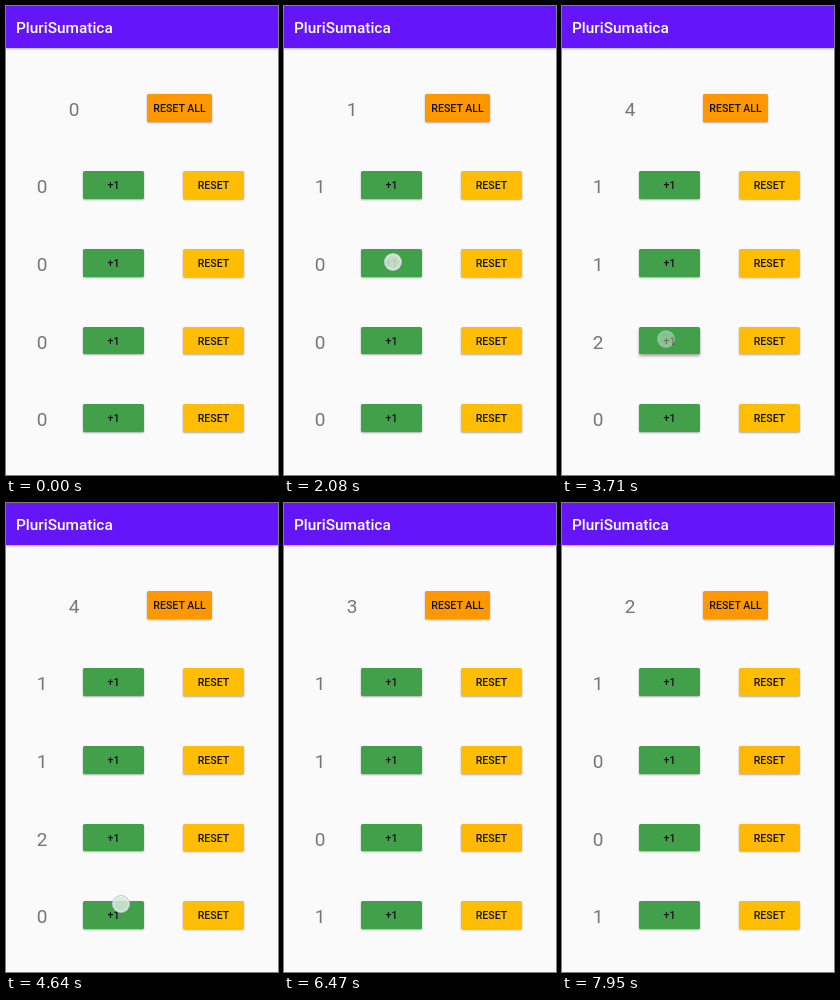
These frames come from a looping animation (272 px wide and 469 px high, 8000 ms). An HTML page:

```html
<!DOCTYPE html>
<html lang="es">
<head>
<meta charset="utf-8">
<style>
html, body { margin: 0; width: 272px; height: 469px; overflow: hidden; background: #fafafa; }
body { position: relative; font-family: Roboto, sans-serif; }
div { position: absolute; box-sizing: border-box; text-align: center; white-space: nowrap; }
header {
  height: 42px; padding-left: 10px; background: #6515fa; color: #fff;
  font: 500 15.4px/44px Roboto, sans-serif; box-shadow: 0 1px 2px rgba(0, 0, 0, .3);
}
.count { width: 40px; height: 31px; font-size: 19px; line-height: 31px; color: #777; }
.button {
  height: 27.8px; border-radius: 1.5px; color: #111;
  font-weight: 500; font-size: 10.58px; line-height: 30px;
  box-shadow: 0 1px 2px rgba(0, 0, 0, .32);
}
.button.pressed { box-shadow: 0 2px 3px rgba(0, 0, 0, .36); }
#touch {
  width: 18px; height: 18px; border-radius: 50%; margin: -9px;
  background: rgba(215, 232, 215, .85); border: 1px solid rgba(185, 192, 225, .9);
  box-shadow: inset 0 0 0 1px rgba(255, 255, 255, .5);
}
</style>
</head>
<body>
<header>PluriSumatica</header>
<script>
const LOOP = 8000;
const TOP = 87.8, PITCH = 77.6;
const GREEN = '#43a04a', YELLOW = '#ffbe04', USED = '#ffb904';

function add(className, x, y, text = '') {
  const el = document.createElement('div');
  el.className = className;
  el.style.left = x + 'px';
  el.style.top = y + 'px';
  el.textContent = text;
  document.body.append(el);
  return el;
}

function addButton(x, y, width, color, text) {
  const el = add('button', x, y, text);
  el.style.width = width + 'px';
  el.style.background = color;
  return el;
}

const total = add('count', 48, TOP, 0);
addButton(141, TOP, 65, '#ff9800', 'RESET ALL');

const rows = [1, 2, 3, 4].map(i => {
  const y = TOP + i * PITCH;
  return {
    count: add('count', 16, y, 0),
    plus: addButton(77, y, 61, GREEN, '+1'),
    reset: addButton(177, y, 61, YELLOW, 'RESET')
  };
});

const touch = add('', 0, 0);
touch.id = 'touch';

// start, end, steps, row, button, touch x, touch y
const taps = [
  [1390, 1620, 4, 0, 'plus', 107, 184],
  [2080, 2370, 5, 1, 'plus', 109, 256],
  [2940, 3170, 4, 2, 'plus', 108, 333],
  [3550, 3860, 5, 2, 'plus', 104, 333],
  [4640, 4950, 5, 3, 'plus', 115, 401],
  [5860, 6240, 6, 2, 'reset', 199, 330],
  [7480, 7950, 7, 1, 'reset', 202, 256]
];

function draw(t) {
  const values = [0, 0, 0, 0];
  touch.style.opacity = 0;
  for (const { plus, reset } of rows) {
    plus.classList.remove('pressed');
    reset.classList.remove('pressed');
    reset.style.background = YELLOW;
  }

  for (const [start, end, steps, row, kind, x, y] of taps) {
    if (t < start) break;
    const step = Math.floor((t - start) / (end - start) * (steps - 1) + 1e-6);
    const left = Math.max(0, steps - 1 - step);
    const button = rows[row][kind];
    // The count changes on release, while the touch dot fades out.
    if (left < 3) values[row] = kind === 'plus' ? values[row] + 1 : 0;
    if (kind === 'reset' && step > 0) button.style.background = USED;
    button.classList.toggle('pressed', step > 0 && left > 0);
    if (left) {
      touch.style.left = x + 'px';
      touch.style.top = y + 'px';
      touch.style.opacity = [0, .15, .55, 1][Math.min(left, 3)];
    }
  }

  rows.forEach(({ count }, i) => count.textContent = values[i]);
  total.textContent = values.reduce((a, b) => a + b);
}

function frame() {
  draw(performance.now() % LOOP);
  requestAnimationFrame(frame);
}
frame();
</script>
</body>
</html>
```
